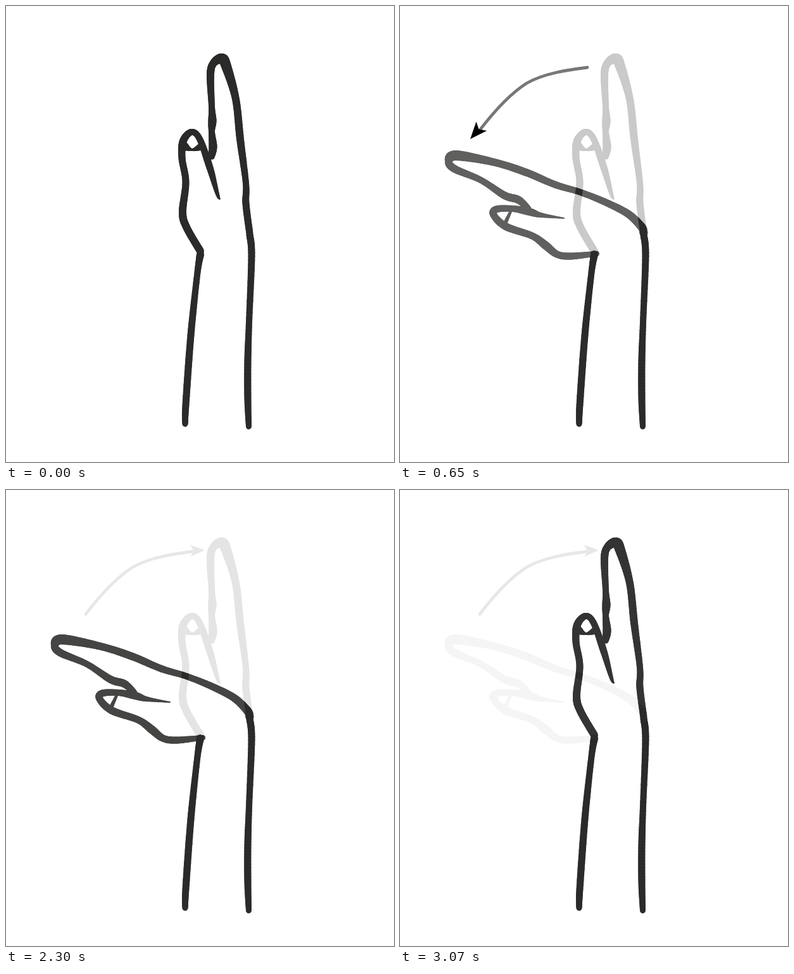
An HTML page with a canvas that plays this animation: 613 px wide and 720 px high, repeating every 3.1 s.

```html
<!DOCTYPE html>
<html lang="en">
<head>
<meta charset="utf-8">
<title>Wrist bend</title>
<style>
  html, body { margin: 0; width: 100%; height: 100%; overflow: hidden; background: #fff; }
  canvas { display: block; }
</style>
</head>
<body>
<canvas id="stage" width="613" height="720"></canvas>
<script>
const stage = document.getElementById('stage').getContext('2d');
const { width, height } = stage.canvas;
const INK = '#2b2b2a', GREY = '#777';

function layer(paint, paper) {
  const canvas = Object.assign(document.createElement('canvas'), { width, height });
  const ctx = canvas.getContext('2d');
  if (paper) {
    ctx.fillStyle = paper;
    ctx.fillRect(0, 0, width, height);
  }
  ctx.lineCap = 'round';
  paint(ctx);
  return canvas;
}

const spline = (a, b, c, d, t) =>
  b + t / 2 * (c - a + t * (2 * a - 5 * b + 4 * c - d + t * (3 * (b - c) + d - a)));

// Smooth brush stroke through "x,y,width" points; a missing width repeats the last one.
function brush(ctx, text) {
  let last;
  const pts = text.trim().split(/\s+/).map(p => {
    const [x, y, w = last] = p.split(',').map(Number);
    return [x, y, last = w];
  });
  const at = i => pts[Math.max(0, Math.min(pts.length - 1, i))];
  const STEPS = 12;
  let from = pts[0];
  ctx.strokeStyle = INK;
  for (let n = 1; n <= (pts.length - 1) * STEPS; n++) {
    const i = Math.floor((n - 1) / STEPS), t = n / STEPS - i;
    const to = [0, 1, 2].map(k => spline(at(i - 1)[k], at(i)[k], at(i + 1)[k], at(i + 2)[k], t));
    ctx.lineWidth = Math.max(.5, to[2]);
    ctx.beginPath();
    ctx.moveTo(from[0], from[1]);
    ctx.lineTo(to[0], to[1]);
    ctx.stroke();
    from = to;
  }
}

function arrow(ctx, x, y, angle, size, headColor) {
  ctx.strokeStyle = GREY;
  ctx.lineWidth = 4.8;
  ctx.stroke(new Path2D('M126 196C152 162 175 138 200 122C228 106 265 101 296 97'));
  ctx.translate(x, y);
  ctx.rotate(angle);
  ctx.scale(size, size);
  ctx.fillStyle = headColor;
  ctx.fill(new Path2D('M0 0L-1 -.41L-.76 0L-1 .41Z'));
}

const upright = layer(ctx => {
  brush(ctx, '325,238,9 327,222,13 325,198,10 326,181,13 325,158,10 323,108,12 328,90 341,83,16 348,95 363,147,12 370,210 379,280,10 379,312,11 385,359');
  brush(ctx, '307,387,12 285,349 279,325 284,278,11 278,240 280,213,12 293,199,10 306,210 322,255,11 334,297,6 338,305,1');
  brush(ctx, '281,221,14 294,227,4 308,222,11');
}, '#fff');

const bent = layer(ctx => {
  brush(ctx, '203,320,9 187,306,12 165,299 128,275,10 86,257,12 77,245 89,236,16 150,247,12 200,263 245,282,11 285,294,10 325,310,11 360,328,12 381,348,13 385,358');
  brush(ctx, '311,391,8 270,395,11 248,392 230,378,13 209,363,11 167,348,12 148,330,11 152,321 178,320,10 205,325,12 222,330,8 259,335,2');
  brush(ctx, '175,324,4 167,341,6');
}, '#fff');

const forearm = layer(ctx => {
  brush(ctx, '307,392,12 302,425,10 292,520,11 284,630 283,660,9');
  brush(ctx, '385,361,11 388,395 384,500,10 382,560,11 382,620 383.5,664,9');
});

const arrowDown = layer(ctx => arrow(ctx, 111, 210, 2.29, 27, '#000'));
const arrowUp = layer(ctx => arrow(ctx, 314, 95, -.04, 23, GREY));

const LOOP = 3100, STEP = 30, STEPS = 6;
const starts = [500, 1650, 2300, 2950];

// Each value fades to the next one in equal steps.
const level = (values, t) => starts.reduce((sum, start, i) => {
  const step = Math.floor((t - start) / STEP) + 1;
  const part = Math.min(1, Math.max(0, step / STEPS));
  return sum + (values[i + 1] - values[i]) * part;
}, values[0]);

function show(image, alpha = 1) {
  stage.globalAlpha = alpha;
  stage.drawImage(image, 0, 0);
}

function render() {
  const t = performance.now() % LOOP;
  show(upright);
  show(bent, level([0, .75, 1, .25, 0], t));
  show(forearm);
  show(arrowDown, level([0, 1, 0, 0, 0], t));
  show(arrowUp, level([0, 0, 0, 1, 0], t));
  requestAnimationFrame(render);
}
render();
</script>
</body>
</html>
```
